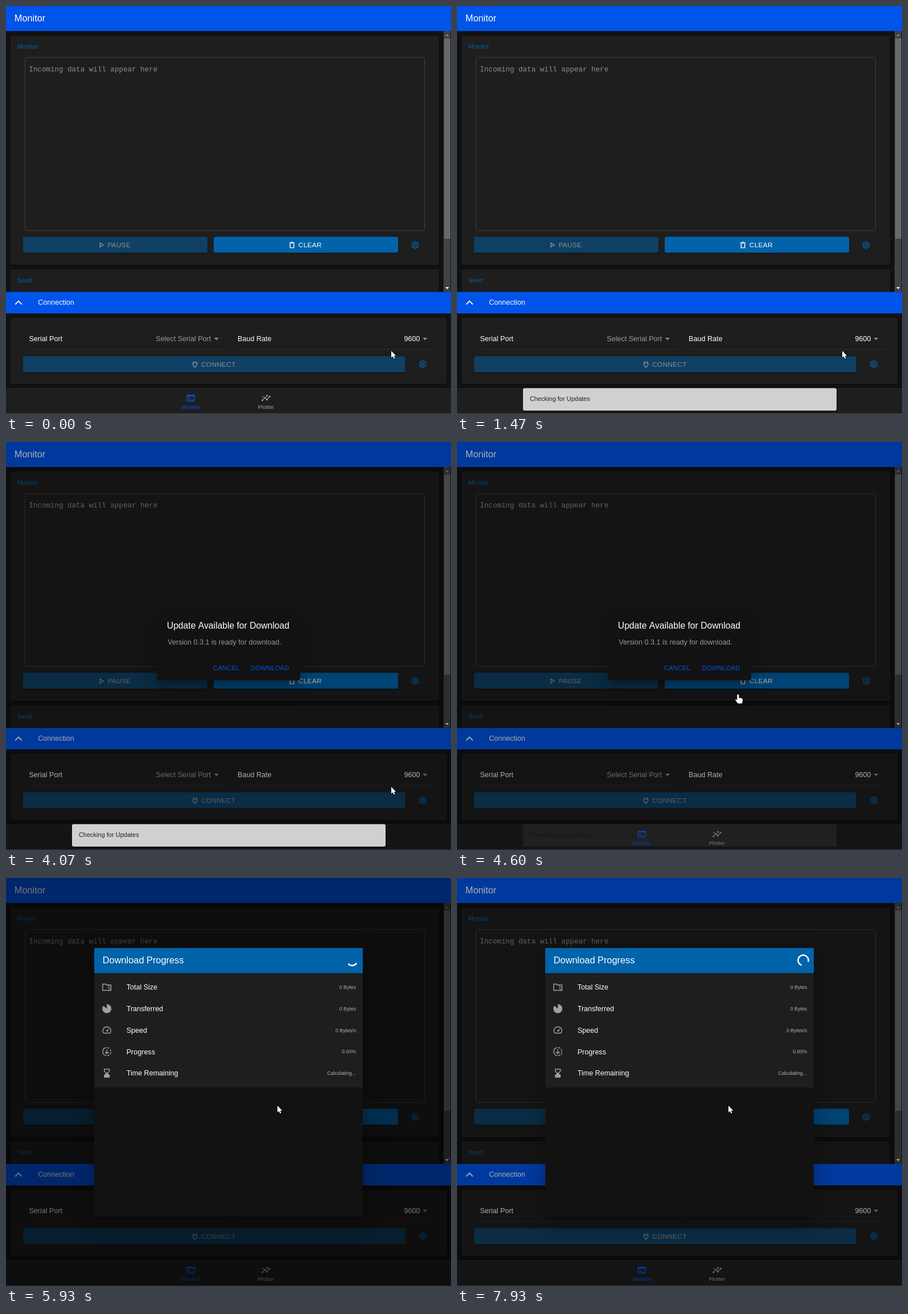
Recreate the animation shown at these times as an HTML page with a canvas. Size 782 by 717 pixels, loop 8000 ms.

```html
<!DOCTYPE html>
<html lang="en">
<head>
<meta charset="utf-8">
<title>Serial monitor update</title>
<style>
html, body { margin: 0; width: 100%; height: 100%; overflow: hidden; background: #121212; }
canvas { display: block; }
</style>
</head>
<body>
<canvas id="stage" width="782" height="717"></canvas>
<script>
const W = 782, H = 717, LOOP = 8000;
const SANS = '"Liberation Sans", Arial, sans-serif';
const MONO = '"Liberation Mono", "Courier New", monospace';
const BLUE = '#0054e9', STEEL = '#0163aa', CARD = '#1e1e1e', PAGE = '#121212';
const DISABLED = '#0f4064', MUTED = '#8e8e8e', ICON = '#a0a0a0';
const BODY = 12.56, SMALL = 11;

const stage = document.getElementById('stage').getContext('2d');
let g = stage;

// ---- drawing helpers ----
function layer(draw) {
  const canvas = document.createElement('canvas');
  canvas.width = W;
  canvas.height = H;
  g = canvas.getContext('2d');
  draw();
  g = stage;
  return canvas;
}

function rect(x, y, w, h, color) {
  g.fillStyle = color;
  g.fillRect(x, y, w, h);
}

function rounded(x, y, w, h, r, color) {
  g.fillStyle = color;
  g.beginPath();
  g.roundRect(x, y, w, h, r);
  g.fill();
}

function text(str, x, y, size, color, { align = 'left', font = SANS, spacing = 0 } = {}) {
  g.font = `${size}px ${font}`;
  g.textAlign = align;
  g.letterSpacing = spacing + 'px';
  g.fillStyle = color;
  g.fillText(str, x, y);
  g.letterSpacing = '0px';
}

function line(points, color, width, close) {
  g.beginPath();
  points.forEach(([x, y]) => g.lineTo(x, y));
  if (close) g.closePath();
  g.strokeStyle = color;
  g.lineWidth = width;
  g.stroke();
}

function shape(points, color) {
  g.beginPath();
  points.forEach(([x, y]) => g.lineTo(x, y));
  g.fillStyle = color;
  g.fill();
}

function arc(x, y, r, from, to, color, width) {
  g.beginPath();
  g.arc(x, y, r, from * Math.PI / 180, to * Math.PI / 180);
  g.strokeStyle = color;
  g.lineWidth = width;
  g.stroke();
}

function dot(x, y, r, color) {
  g.beginPath();
  g.arc(x, y, r, 0, 7);
  g.fillStyle = color;
  g.fill();
}

// Each shadow is [offsetY, blur, spread, alpha]; the caster stays off stage.
function shadow(x, y, w, h, list) {
  for (const [dy, blur, spread, alpha] of list) {
    g.save();
    g.shadowColor = `rgba(0,0,0,${alpha})`;
    g.shadowBlur = blur;
    g.shadowOffsetX = 2000;
    g.shadowOffsetY = dy;
    rounded(x - spread - 2000, y - spread, w + 2 * spread, h + 2 * spread, 3, '#000');
    g.restore();
  }
}

const LOW = [[2.4, 1, -1.6, .2], [1.6, 1.6, 0, .14], [.8, 4, 0, .12]];
const HIGH = [[8.6, 12, -5.5, .2], [19, 30, 2.4, .14], [7, 36, 6.3, .12]];

function raised(x, y, w, h, color) {
  shadow(x, y, w, h, LOW);
  rounded(x, y, w, h, 3, color);
}

// ---- icons ----
function gear(cx, cy) {
  const pts = [];
  for (let i = 0; i < 6; i++) {
    for (const [off, r] of [[-22, 4.5], [-13, 6], [13, 6], [22, 4.5]]) {
      const a = (i * 60 + 30 + off) * Math.PI / 180;
      pts.push([cx + r * Math.sin(a + Math.PI / 6), cy - r * Math.cos(a + Math.PI / 6)]);
    }
  }
  line(pts, STEEL, 1.3, true);
  arc(cx, cy, 2, 0, 360, STEEL, 1.3);
}

function caret(x, y) {
  shape([[x - 4, y - 2], [x + 4, y - 2], [x, y + 2.2]], MUTED);
}

function trash(x, y) {
  line([[x - 3.2, y - 2.7], [x - 3.2, y + 4.9], [x + 3.2, y + 4.9], [x + 3.2, y - 2.7]], '#fff', 1.4);
  line([[x - 4.6, y - 3.6], [x + 4.6, y - 3.6]], '#fff', 1.5);
  line([[x - 1.8, y - 4.9], [x + 1.8, y - 4.9]], '#fff', 1.3);
}

function plug(x, y) {
  for (const dx of [-2.3, 2.3]) line([[x + dx, y - 5.5], [x + dx, y - 2.5]], MUTED, 1.4);
  line([[x - 3.6, y - 2.3], [x + 3.6, y - 2.3], [x + 3.6, y + 1.2], [x + 1.3, y + 3.6],
    [x + 1.3, y + 5], [x - 1.3, y + 5], [x - 1.3, y + 3.6], [x - 3.6, y + 1.2]], MUTED, 1.3, true);
}

function terminal(x, y) {
  g.beginPath();
  g.roundRect(x - 6.4, y - 4.9, 12.8, 10.2, 1);
  g.strokeStyle = BLUE;
  g.lineWidth = 1.4;
  g.stroke();
  rect(x - 7, y - 5.6, 14, 2.8, BLUE);
  line([[x - 4, y - 1.6], [x - 1.6, y + .8], [x - 4, y + 3.2]], BLUE, 1.3);
  line([[x + .4, y + 3.2], [x + 4.2, y + 3.2]], BLUE, 1.3);
}

function star(x, y, r) {
  const k = r * .3;
  shape([[x, y - r], [x + k, y - k], [x + r, y], [x + k, y + k],
    [x, y + r], [x - k, y + k], [x - r, y], [x - k, y - k]], ICON);
}

function insights(x, y) {
  const pts = [[x - 6.3, y + 4], [x - 2, y - .6], [x + 1.4, y + 2.8], [x + 6.3, y - 2.6]];
  line(pts, ICON, 1.2);
  pts.forEach(([px, py]) => dot(px, py, 1.5, ICON));
  star(x + 1.5, y - 3.7, 2.7);
  star(x - 5.7, y - 2.2, 1.7);
}

function folder(x, y) {
  line([[x - 7.2, y - 5.4], [x - 2, y - 5.4], [x - .5, y - 3.9], [x + 7.2, y - 3.9],
    [x + 7.2, y + 5.6], [x - 7.2, y + 5.6]], ICON, 1.5, true);
  for (let i = 0; i < 4; i++) rect(x + (i % 2 ? 3.6 : 2), y - 3 + i * 2, 1.6, 1.6, ICON);
}

function pie(x, y) {
  g.beginPath();
  g.moveTo(x, y);
  g.arc(x, y, 7.9, -Math.PI / 2, Math.PI * 1.22);
  g.fillStyle = ICON;
  g.fill();
}

function gauge(x, y) {
  arc(x, y + 1, 7, 145, 395, ICON, 1.5);
  line([[x - 6, y + 5.2], [x + 6, y + 5.2]], ICON, 1.5);
  shape([[x - 1.6, y + 1], [x + 4.4, y - 3.2], [x + 1, y + 3]], ICON);
}

function downloading(x, y) {
  arc(x, y, 7.2, 97, 263, ICON, 1.5);
  for (const a of [-83, -35, 8, 52]) arc(x, y, 7.2, a, a + 30, ICON, 1.5);
  line([[x, y - 4], [x, y + 2]], ICON, 1.5);
  line([[x - 3.2, y + .4], [x, y + 3.6], [x + 3.2, y + .4]], ICON, 1.5);
}

function hourglass(x, y) {
  line([[x - 4.4, y - 7], [x + 4.4, y - 7], [x + 4.4, y - 3.6], [x + 1, y], [x - 1, y], [x - 4.4, y - 3.6]], ICON, 1.4, true);
  shape([[x - 1.4, y], [x + 1.4, y], [x + 5, y + 3.6], [x + 5, y + 7.8], [x - 5, y + 7.8], [x - 5, y + 3.6]], ICON);
}

// ---- static layers ----
const app = layer(() => {
  rect(0, 0, W, H, PAGE);
  raised(8, 52, 753, 403, CARD);
  raised(8, 463, 753, 60, CARD);
  rect(0, 0, W, 44, BLUE);
  text('Monitor', 14.8, 27.3, 16.35, '#fff');

  text('Monitor', 19.8, 74.5, SMALL, STEEL);
  g.beginPath();
  g.roundRect(33.5, 90.5, 702, 304, 3);
  g.strokeStyle = '#3f3f3f';
  g.lineWidth = 1;
  g.stroke();
  text('Incoming data will appear here', 40.3, 115, BODY, MUTED, { font: MONO });

  const label = { spacing: .34 };
  raised(30, 405.5, 324, 28, DISABLED);
  line([[165, 416.4], [171, 420], [165, 423.6]], MUTED, 1.4, true);
  text('PAUSE', 178.4, 424.2, 11.8, MUTED, label);
  raised(365, 405.5, 324, 28, STEEL);
  trash(502.5, 420);
  text('CLEAR', 513.8, 424.2, 11.8, '#fff', label);
  gear(719, 420);
  text('Send', 19.8, 486, SMALL, STEEL);

  rect(769, 44, 12, 459, '#424242');
  rect(770, 57, 11, 352, '#686868');
  shape([[772, 53], [778.4, 53], [775.2, 49.5]], '#868686');
  shape([[772, 494], [778.4, 494], [775.2, 497.6]], '#fff');

  rect(0, 502.5, W, H, PAGE);
  rect(0, 502.5, W, 37.7, BLUE);
  line([[16.2, 524.4], [22, 518.6], [27.8, 524.4]], '#fff', 1.9);
  text('Connection', 56.2, 525.3, BODY, '#fff');

  raised(8, 548, 766, 116, CARD);
  text('Serial Port', 40.5, 589, BODY, '#fff');
  text('Select Serial Port', 263.3, 589, BODY, '#9a9a9a');
  caret(369.8, 585);
  text('Baud Rate', 407.1, 589, BODY, '#fff');
  text('9600', 699.6, 589, BODY, '#fff');
  caret(736.3, 585);
  rect(41, 603, 347, 1, '#2c2c2c');
  rect(408, 603, 346, 1, '#2c2c2c');
  raised(30, 615.5, 671.5, 28, DISABLED);
  plug(332, 629.7);
  text('CONNECT', 343, 634, 11.8, MUTED, label);
  gear(732.3, 629.5);

  rect(0, 672, W, 44, CARD);
  rect(0, 672, W, 1, '#2a2a2a');
  terminal(324.7, 689);
  text('Monitor', 324.5, 707.6, 9.9, BLUE, { align: 'center' });
  insights(457, 689);
  text('Plotter', 456.8, 707.6, 9.9, ICON, { align: 'center' });
  rect(0, 716, W, 1, '#4c4c4c');
});

const alertBox = layer(() => {
  shadow(265, 298, 252, 121, HIGH);
  rounded(265, 298, 252, 121, 3, PAGE);
  text('Update Available for Download', 282.8, 328.3, 15.7, '#fff');
  text('Version 0.3.1 is ready for download.', 284.2, 356.2, BODY, '#999');
  text('CANCEL', 364, 401, SMALL, BLUE, { spacing: .25 });
  text('DOWNLOAD', 430.6, 401, SMALL, BLUE, { spacing: .25 });
});

const modal = layer(() => {
  shadow(155, 123, 472, 472, HIGH);
  rounded(155, 123, 472, 472, 2, PAGE);
  rect(155, 167, 472, 201, CARD);
  rounded(155, 123, 472, 44, [2, 2, 0, 0], STEEL);
  text('Download Progress', 169.8, 150, 16.35, '#fff');
  const rows = [
    ['Total Size', '0 Bytes', folder],
    ['Transferred', '0 Bytes', pie],
    ['Speed', '0 Bytes/s', gauge],
    ['Progress', '0.00%', downloading],
    ['Time Remaining', 'Calculating...', hourglass]
  ];
  rows.forEach(([name, value, icon], i) => {
    const y = 191.8 + i * 37.8;
    icon(177.2, y);
    text(name, 211.7, y + 4.3, BODY, '#fff');
    text(value, 615, y + 3.2, 8.75, '#b0b0b0', { align: 'right' });
  });
});

const toast = layer(() => {
  shadow(116, 671.5, 551, 39.5, LOW);
  rounded(116, 671.5, 551, 39.5, 3, '#d0d0d0');
  text('Checking for Updates', 127.9, 694, SMALL, '#222');
});

// ---- timing ----
function bezier(x1, y1, x2, y2) {
  const at = (a, b, s) => 3 * (1 - s) * (1 - s) * s * a + 3 * (1 - s) * s * s * b + s * s * s;
  return x => {
    if (x <= 0) return 0;
    if (x >= 1) return 1;
    let lo = 0, hi = 1;
    for (let i = 0; i < 24; i++) {
      const mid = (lo + hi) / 2;
      if (at(x1, x2, mid) < x) lo = mid; else hi = mid;
    }
    return at(y1, y2, lo);
  };
}

const easeInOut = bezier(.42, 0, .58, 1);
const swift = bezier(.36, .66, .04, 1);
const easeOut = bezier(0, 0, .58, 1);
const ramp = (t, start, length, ease) => ease((t - start) / length);
const mix = (a, b, p) => a + (b - a) * p;

function dim(p) {
  if (p > 0) rect(0, 0, W, H, `rgba(0,0,0,${.32 * p})`);
}

function spinner(t) {
  const phase = ((t - 5636) / 1400) % 1, unit = 360 / (40 * Math.PI);
  const grow = easeInOut(phase * 2), run = easeInOut(phase * 2 - 1);
  const start = 15 * grow + 110 * run;
  const end = Math.min(start + 1 + 99 * grow, 40 * Math.PI);
  const turn = 16 + (t - 5930) * 360 / 2000;
  arc(608.5, 144.7, 9.16, turn + start * unit, turn + end * unit, '#fff', 2.57);
}

function pointer(t) {
  const a = ramp(t, 4230, 370, easeInOut), b = ramp(t, 4600, 370, easeOut);
  const x = mix(mix(677, 494, a), 477, b), y = mix(mix(606, 444, a), 400, b);
  const hand = a > 0 && y > 419;
  g.save();
  g.translate(x, y);
  const outline = new Path2D(hand
    ? 'M-1.6 .6Q0-1 1.5 .6V5.6L6.6 6.7Q8.4 7.3 8.2 9.4L7 15.6H-.4L-4.7 10Q-4.9 8-2.9 8.6L-1.6 9.8Z'
    : 'M0 0V12L2.7 9.5L4.5 13.7L6.5 12.8L4.7 8.7H8.4Z');
  g.strokeStyle = '#000';
  g.lineWidth = 1.2;
  g.stroke(outline);
  g.fillStyle = '#fff';
  g.fill(outline);
  g.restore();
}

function render(t) {
  g.drawImage(app, 0, 0);

  const enter = ramp(t, 3890, 150, easeInOut);
  const shown = enter * (1 - ramp(t, 5940, 150, easeInOut));
  if (shown > 0) {
    dim(shown);
    g.save();
    g.globalAlpha = shown;
    g.translate(W / 2, H / 2);
    g.scale(.9 + .1 * enter, .9 + .1 * enter);
    g.translate(-W / 2, -H / 2);
    g.drawImage(alertBox, 0, 0);
    const hover = ramp(t, 5090, 180, easeInOut);
    if (hover > 0) rounded(423, 381, 81, 32, 2, `rgba(0,84,233,${.12 * hover})`);
    g.restore();
  }

  const open = ramp(t, 5640, 280, swift);
  if (open > 0) {
    dim(open);
    g.save();
    g.globalAlpha = open;
    g.translate(0, 31.4 * (1 - open));
    g.drawImage(modal, 0, 0);
    spinner(t);
    g.restore();
  }

  const notice = ramp(t, 1040, 400, swift) * (1 - ramp(t, 4455, 300, swift));
  if (notice > 0) {
    g.globalAlpha = notice;
    g.drawImage(toast, 0, 0);
    g.globalAlpha = 1;
  }
  pointer(t);
}

const begin = performance.now();
function tick() {
  render((performance.now() - begin) % LOOP);
  requestAnimationFrame(tick);
}
tick();
</script>
</body>
</html>
```
